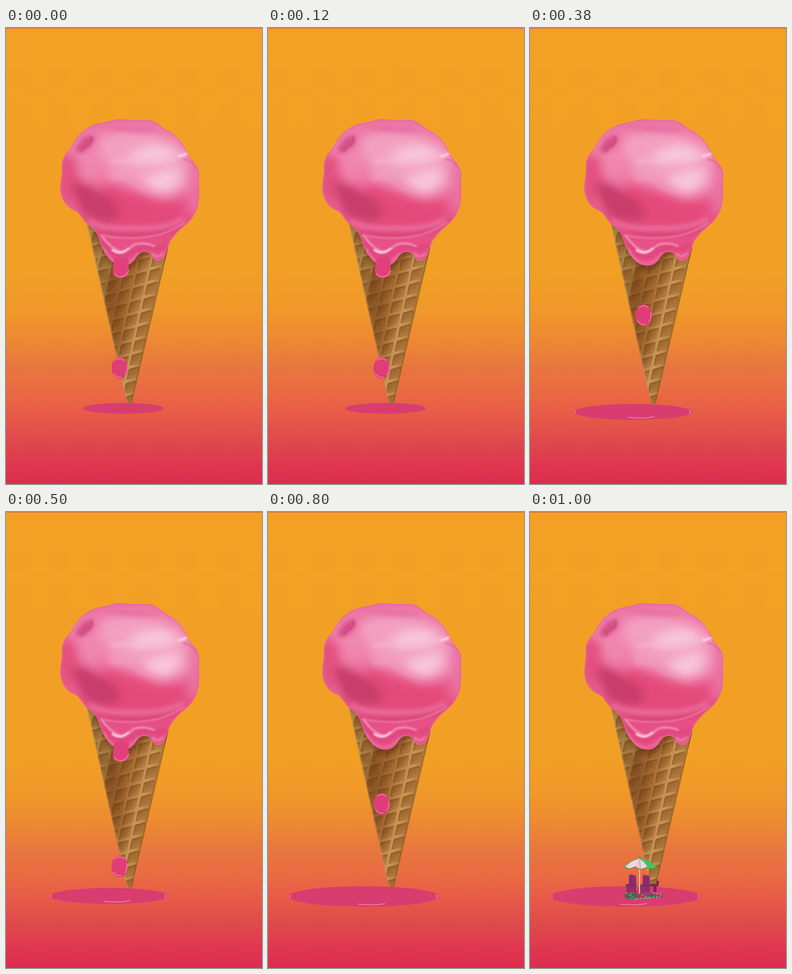
An HTML page that plays this animation: 500x889 px, repeating every 1.2 s.

```html
<!DOCTYPE html>
<html lang="en">
<head>
<meta charset="utf-8">
<title>Melting ice cream</title>
<style>
  html, body { margin: 0; width: 100%; height: 100%; overflow: hidden; background: #f2a024; }
  svg { display: block; width: 100%; height: 100%; }
</style>
</head>
<body>
<svg viewBox="0 0 500 889" preserveAspectRatio="none">
  <defs>
    <linearGradient id="sky" gradientUnits="userSpaceOnUse" x1="0" y1="0" x2="0" y2="889">
      <stop offset="0" stop-color="#f2a125"/>
      <stop offset=".54" stop-color="#f19f25"/>
      <stop offset=".62" stop-color="#f0982a"/>
      <stop offset=".68" stop-color="#ed8a32"/>
      <stop offset=".74" stop-color="#e8773f"/>
      <stop offset=".8" stop-color="#ea6a43"/>
      <stop offset=".85" stop-color="#e75a48"/>
      <stop offset=".91" stop-color="#de484c"/>
      <stop offset=".96" stop-color="#df364f"/>
      <stop offset="1" stop-color="#dd2c4f"/>
    </linearGradient>
    <linearGradient id="wafer" gradientUnits="userSpaceOnUse" x1="187" y1="520" x2="298" y2="546">
      <stop offset="0" stop-color="#a98046"/>
      <stop offset=".12" stop-color="#94602e"/>
      <stop offset=".45" stop-color="#a66e36"/>
      <stop offset=".75" stop-color="#cb9858"/>
      <stop offset="1" stop-color="#ad7536"/>
    </linearGradient>
    <linearGradient id="cell" x1="0" y1="0" x2="1" y2="1">
      <stop offset="0" stop-color="#6e3a0c" stop-opacity=".58"/>
      <stop offset="1" stop-color="#945a24" stop-opacity=".35"/>
    </linearGradient>
    <pattern id="grid" width="28" height="27.5" patternUnits="userSpaceOnUse"
             patternTransform="matrix(.964 -.26 -.216 1 258.5 450)">
      <rect x="2.5" y="2.5" width="22.5" height="22" rx="3" fill="url(#cell)"/>
      <path d="M4 24V5H23" fill="none" stroke="#653407" stroke-opacity=".28" stroke-width="1.5"/>
      <path d="M8 20.5H21V8" fill="none" stroke="#d09b57" stroke-opacity=".25" stroke-width="1.5"/>
    </pattern>
    <linearGradient id="cream" gradientUnits="userSpaceOnUse" x1="225" y1="178" x2="240" y2="463">
      <stop offset="0" stop-color="#ec72a3"/>
      <stop offset=".25" stop-color="#f088b0"/>
      <stop offset=".5" stop-color="#ec6d9b"/>
      <stop offset=".7" stop-color="#e54e80"/>
      <stop offset="1" stop-color="#e9558a"/>
    </linearGradient>
    <path id="scoopShape" d="M228 178C250 181 270 177 286 181C298 185 304 194 314 199C334 208 347 226 355 244
      C361 258 372 264 376 277C380 288 375 296 377 310C378 334 376 350 367 365C358 382 340 389 329 405
      C320 414 317 424 313 439C310 450 301 455 294 454C285 452 286 442 278 438C269 434 260 438 254 447
      C247 460 238 464 227 463C210 463 199 448 191 435C184 422 182 405 173 394C166 386 157 383 150 372
      C144 364 140 357 132 355C117 348 107 333 106 313C106 300 110 287 109 271C109 255 116 244 125 236
      C134 217 146 201 163 193C178 184 198 184 208 180C215 177 221 178 228 178Z"/>
    <clipPath id="scoopClip"><use href="#scoopShape"/></clipPath>
    <clipPath id="coneClip"><path d="M158 381L236 731Q241 738 246 731L317 428Q240 350 158 381Z"/></clipPath>
    <filter id="soft" x="-50%" y="-50%" width="200%" height="200%"><feGaussianBlur stdDeviation="10"/></filter>
    <filter id="blur" x="-50%" y="-50%" width="200%" height="200%"><feGaussianBlur stdDeviation="5"/></filter>
    <filter id="fine" x="-50%" y="-50%" width="200%" height="200%"><feGaussianBlur stdDeviation="1.8"/></filter>
  </defs>

  <rect width="500" height="889" fill="url(#sky)"/>
  <rect width="500" height="1" fill="#e0564a"/>

  <g clip-path="url(#coneClip)">
    <rect x="150" y="370" width="180" height="370" fill="url(#wafer)"/>
    <rect x="150" y="370" width="180" height="370" fill="url(#grid)"/>
    <path d="M158 381L236 733" stroke="#c79d64" stroke-width="5" stroke-opacity=".45"/>
    <path d="M317 428L246 733" stroke="#75420f" stroke-width="6" stroke-opacity=".4" filter="url(#fine)"/>
    <path d="M172 385Q190 465 229 475Q252 468 270 443L318 446V400Z" fill="#602d09" opacity=".5" filter="url(#blur)"/>
    <path d="M188 470L215 620L232 650L218 480Z" fill="#653209" opacity=".3" filter="url(#soft)"/>
  </g>

  <use href="#scoopShape" fill="url(#cream)"/>
  <g clip-path="url(#scoopClip)">
    <g filter="url(#soft)">
      <path d="M185 212Q240 195 300 210Q345 232 350 255Q300 275 205 262Q175 255 185 212Z" fill="#f3a0c0"/>
      <path d="M235 252Q285 215 335 240Q325 264 270 266Z" fill="#f8c8dc"/>
      <path d="M200 270Q270 262 352 258Q366 285 350 312Q320 335 280 318Q240 290 200 292Z" fill="#f2a0c1"/>
      <path d="M265 298Q310 270 340 278Q335 318 300 325Z" fill="#f8c5da"/>
      <path d="M98 250Q126 235 139 260Q138 290 152 310L118 350Q90 320 98 250Z" fill="#e3517f"/>
      <path d="M148 258Q170 245 190 262Q178 292 152 290Z" fill="#ef86ae"/>
      <path d="M190 300Q225 315 265 330Q325 350 355 335Q355 373 300 386Q225 390 190 368Z" fill="#e4487a"/>
      <path d="M355 265L385 265V345Q365 380 355 350Z" fill="#ea72a2"/>
      <path d="M130 300Q158 300 190 325Q225 342 224 366Q205 386 165 372Q136 350 130 300Z" fill="#c83c6c"/>
    </g>
    <g filter="url(#blur)">
      <path d="M134 308Q160 312 184 328Q208 345 210 362Q180 372 150 350Z" fill="#c83c6c" opacity=".6"/>
      <path d="M150 216Q160 208 172 211Q172 230 150 242Q135 248 136 234Z" fill="#d65086"/>
      <path d="M185 193Q225 187 245 194Q280 192 302 202Q265 203 237 201Q212 197 185 193Z" fill="#e56c9f"/>
      <path d="M160 376Q200 395 250 390Q310 394 348 372" fill="none" stroke="#ee78a6" stroke-width="7"/>
      <path d="M195 397Q245 408 300 398Q330 393 350 380" fill="none" stroke="#d23c70" stroke-width="7"/>
      <path d="M205 262Q235 255 262 262Q310 260 350 245" fill="none" stroke="#f7bfd6" stroke-width="5"/>
      <path d="M205 294Q225 288 242 298Q263 317 292 318" fill="none" stroke="#f1a0c0" stroke-width="5"/>
      <path d="M178 398Q195 438 228 447Q255 430 275 426Q300 437 318 420" fill="none" stroke="#dd4279" stroke-width="9"/>
    </g>
    <g fill="none" filter="url(#fine)" stroke-linecap="round">
      <path d="M166 212Q170 220 163 227Q152 232 148 240" stroke="#c9467a" stroke-width="3"/>
      <path d="M338 250Q350 247 356 244" stroke="#fbd4e4" stroke-width="4"/>
      <path d="M347 256Q360 256 371 273" stroke="#e26a99" stroke-width="3"/>
      <path d="M186 404Q207 433 226 436Q240 433 249 423Q267 416 289 425" stroke="#f08db3" stroke-width="4"/>
      <path d="M208 433Q225 444 239 430" stroke="#fbd0e0" stroke-width="4"/>
      <path d="M191 405Q245 415 300 403Q330 393 348 380" stroke="#ef76a4" stroke-width="3"/>
      <path d="M193 432Q205 459 229 458Q246 456 256 440" stroke="#ec699c" stroke-width="4"/>
      <path d="M287 440Q294 450 306 440" stroke="#ee7ca8" stroke-width="4"/>
      <use href="#scoopShape" stroke="#e9659b" stroke-width="3"/>
    </g>
  </g>

  <g id="puddle">
    <ellipse id="pool" fill="#d93d70"/>
    <path id="glint" fill="none" stroke="#ef86ac" stroke-width="1.6" stroke-linecap="round"/>
  </g>

  <g id="bud">
    <path d="M211 450Q225 445 240 451L239 463Q244 486 224 487Q204 486 210 463Z" fill="#e0417a"/>
    <path d="M212 479Q218 487 229 484Q237 481 239 473" fill="none" stroke="#ef78a6" stroke-width="2" stroke-linecap="round"/>
  </g>

  <g id="drop">
    <ellipse rx="16" ry="21" fill="#df3d75"/>
    <path d="M-9-15Q0-22 9-15M14-5Q16 6 10 13M-12 11Q-6 19 3 18" fill="none" stroke="#ef78a6" stroke-width="1.8" stroke-linecap="round"/>
  </g>

  <g id="beach">
    <path d="M184 744L205 739L261 746L258 753L210 756L185 752Z" fill="#a83a63"/>
    <path d="M185 744H207V754H189ZM228 747L240 744L246 751H230Z" fill="#3b6a4c"/>
    <path d="M185 743L207 754L259 748M210 742L234 754M197 743V754" fill="none" stroke="#58bd70" stroke-width="1.5" stroke-dasharray="5 3"/>
    <path d="M204 755L256 752M241 743L257 745" stroke="#e7b5c4" stroke-width="1.3" stroke-dasharray="3 3"/>
    <g id="chair">
      <path d="M193 709L197 706L207 709L208 728L205 741H190L187 727L193 724Z" fill="#952f6c"/>
      <path d="M197 710V734M202 711V735M187 727H207M190 730V742M206 730V742" fill="none" stroke="#6f2859" stroke-width="1.3"/>
    </g>
    <use href="#chair" x="27" y="1"/>
    <path d="M235 725H251V730H247V741H241V730H235ZM247 719H252V725H247Z" fill="#792654"/>
    <path d="M214 672V743" stroke="#dfc5ac" stroke-width="2"/>
    <path d="M183 692Q194 680 214 675Q238 679 247 693L238 696L229 693L215 697L205 692L195 696Z" fill="#49bd65"/>
    <path d="M186 692Q198 679 214 676L205 691L195 695ZM215 677Q224 682 229 692L216 696Z" fill="#f0d7df"/>
    <path d="M214 676Q207 683 205 691L215 696Z" fill="#f6c4d2"/>
    <path d="M183 692L195 696L205 692L215 697L229 693L238 696L247 693" fill="none" stroke="#329551" stroke-width="1"/>
    <circle cx="214" cy="673" r="2" fill="#3fab59"/>
  </g>
</svg>
<script>
  const $ = id => document.getElementById(id);
  const LOOP = 1200;
  const small = { cx: 229.5, cy: 741.5, rx: 78.5, ry: 10.5 };
  const medium = { cx: 201, cy: 748.5, rx: 116, ry: 15.5, glint: true };
  const large = { cx: 187, cy: 749.5, rx: 147, ry: 20, glint: true };

  // Stepped poses: each one holds until the next begins.
  const poses = [
    { at: 0, pool: small, dropY: 663, bud: true },
    { at: 200, pool: medium, dropY: 560 },
    { at: 500, pool: medium, dropY: 691, bud: true },
    { at: 800, pool: large, dropY: 569 },
    { at: 1000, pool: large, beach: true }
  ];

  const show = (id, on) => $(id).setAttribute('visibility', on ? 'visible' : 'hidden');

  function drawPool({ cx, cy, rx, ry, glint }) {
    Object.entries({ cx, cy, rx, ry }).forEach(([key, value]) => $('pool').setAttribute(key, value));
    const y = cy + ry - 5;
    $('glint').setAttribute('d',
      `M${cx - 10} ${y}Q${cx + 20} ${y + 3} ${cx + 41} ${y - 1}` +
      `M${cx + rx - 6} ${cy - 3}q6 3 0 6M${cx - rx + 4} ${cy - 2}q-4 2 0 4`);
    show('glint', glint);
  }

  let current;
  function render(time) {
    const t = time % LOOP;
    const pose = poses.findLast(p => p.at <= t);
    if (pose !== current) {
      current = pose;
      drawPool(pose.pool);
      show('bud', pose.bud);
      show('beach', pose.beach);
      show('drop', pose.dropY);
      $('drop').setAttribute('transform', `translate(222 ${pose.dropY || 0})`);
    }
  }

  const start = performance.now();
  function tick() {
    render(performance.now() - start);
    requestAnimationFrame(tick);
  }
  tick();
</script>
</body>
</html>
```
